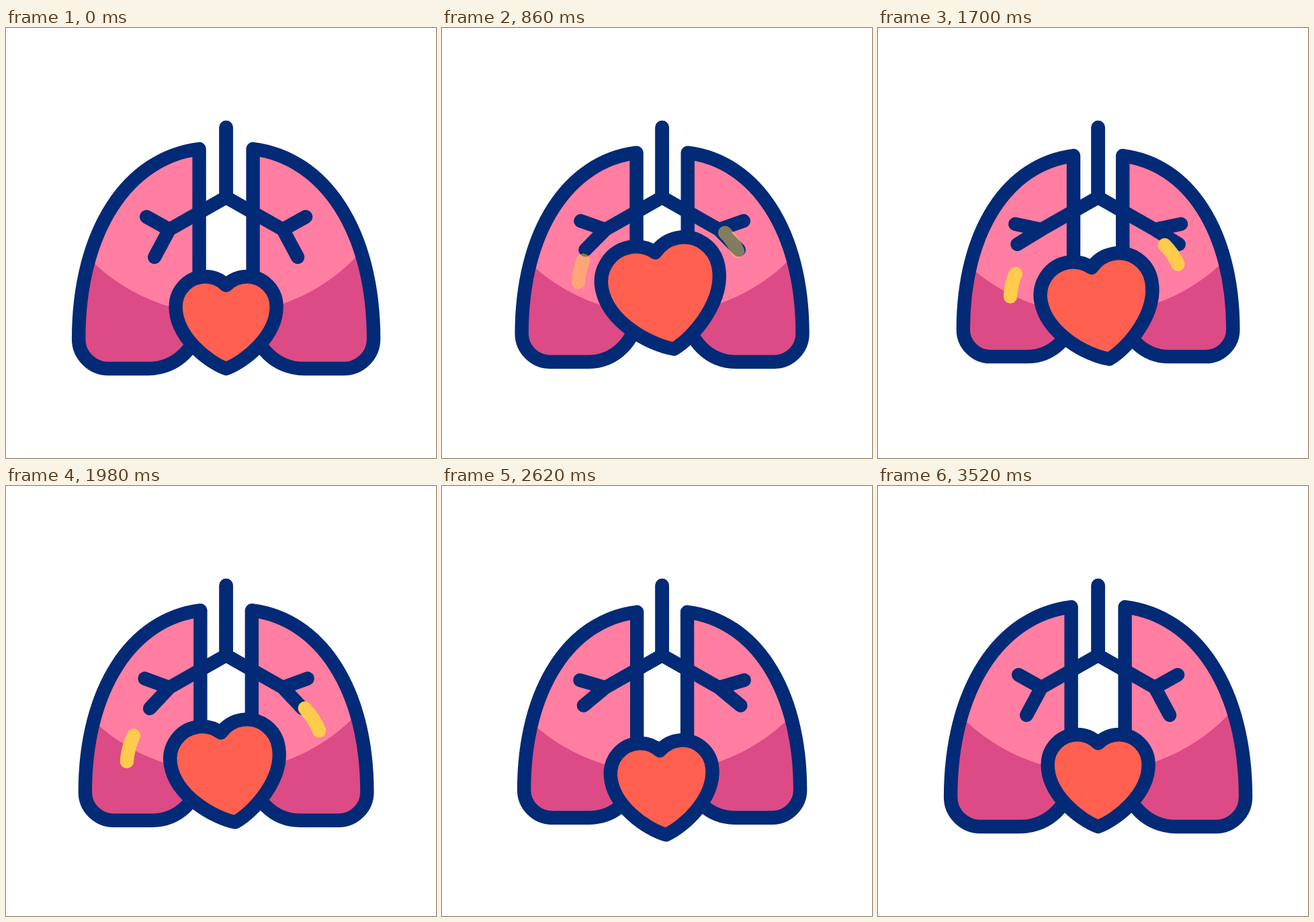
Write an HTML page with a canvas that moves like this. It is 640 by 640 pixels and loops after 3.6 s.

```html
<!DOCTYPE html>
<html lang="en">
<head>
<meta charset="utf-8">
<title>Heart and lungs</title>
<style>
  html, body { margin: 0; width: 100%; height: 100%; overflow: hidden; background: #fff; }
  canvas { display: block; }
</style>
</head>
<body>
<canvas id="stage" width="640" height="640"></canvas>
<script>
const ctx = document.getElementById('stage').getContext('2d');
const LOOP = 3600, END = 3520, MID = 327.6;
const NAVY = '#032a76', PINK = '#ff7ea1', ROSE = '#dc4b85', RED = '#ff6050', YELLOW = '#ffcb4c';

// Paths are relative to their own pivot: lungs (MID, 298), heart (MID, 428).
const lung = new Path2D(`M-40-118V134C-40 176-74.5 209-115.5 209H-175.5
  C-199.5 209-219.5 189-219.5 165C-219.5 4-146.5-105-40-118Z`);
const heart = new Path2D(`M0-45C-8.5-53.5-19.5-58-31-58C-55.5-58-75-38-75-13
  C-75 31-27.5 69 0 79C27.5 69 75 31 75-13C75-38 55.5-58 31-58C19.5-58 8.5-53.5 0-45Z`);
const beat = new Path2D('M113-63Q123-48 127-31M-113-63Q-123-48-127-31');

const span = (t, from, to) => Math.min(1, Math.max(0, (t - from) / (to - from)));
const ease = p => (1 - Math.cos(Math.PI * p)) / 2;

// Lungs alternate between full (0) and contracted (1) at these times.
const turns = [0, 600, 1160, 1640, 2330, 2775, END];

function breath(t) {
  const i = Math.max(1, turns.findIndex(turn => turn >= t));
  const p = ease(span(t, turns[i - 1], turns[i]));
  if (t >= END) return 0;
  return i % 2 ? p : 1 - p;
}

// The heart rocks from side to side, then slowly straightens.
function tilt(t) {
  const first = 245, half = 425, last = first + 3.5 * half;
  if (t < first) return 0;
  if (t < last) return 11.2 * Math.sin(Math.PI * (t - first) / half);
  return -11.2 * (1 - span(t, last, END)) ** 1.4;
}

// Transforms geometry only, so line weight stays constant.
function place(path, x, y, degrees, sx, sy) {
  const out = new Path2D();
  out.addPath(path, new DOMMatrix().translate(x, y).rotate(degrees).scale(sx, sy));
  return out;
}

function stroke(path, color = NAVY) {
  ctx.strokeStyle = color;
  ctx.stroke(path);
}

function drawLung(side, scale) {
  const shape = place(lung, MID, 298, 0, side * scale, scale);
  ctx.save();
  ctx.clip(shape);
  ctx.fillStyle = ROSE;
  ctx.fillRect(0, 0, 640, 640);
  ctx.fillStyle = PINK;
  ctx.beginPath();
  ctx.arc(321.4, 149.4, 276.5, 0, 2 * Math.PI);
  ctx.fill();
  ctx.restore();
  stroke(shape);
}

function drawBronchi(side, b) {
  const path = new Path2D(`M0 148V252L-84.5 300L${-118.5 - 5 * b} ${281 + 11 * b}
    M-84.5 300L${-106.5 - 14 * b} ${341 - 19.5 * b}`);
  stroke(place(path, MID, 0, 0, side, 1));
}

function drawHeart(t) {
  const rise = ease(span(t, 0, 920));
  const fall = span(t, 920, 2800) ** 1.25;
  const settle = ease(span(t, 2800, END));
  const y = 428 - 42 * rise + 60.5 * fall - 18.5 * settle;
  const scale = 1 + .18 * rise - .19 * fall + .01 * settle;
  const angle = tilt(t);

  const appear = span(t, 780, 940);
  const reach = .9 + .1 * appear + .45 * span(t, 1760, 2460);
  const marks = place(beat, 0, 47 * (reach - 1), 0, reach, reach);
  ctx.globalAlpha = appear - span(t, 2200, 2500);
  stroke(place(marks, MID, y, angle, 1, 1), YELLOW);
  ctx.globalAlpha = 1;

  const shape = place(heart, MID, y, angle, scale, scale);
  ctx.fillStyle = RED;
  ctx.fill(shape);
  stroke(shape);
}

function draw(t) {
  ctx.fillStyle = '#fff';
  ctx.fillRect(0, 0, 640, 640);
  ctx.lineWidth = 20.4;
  ctx.lineCap = ctx.lineJoin = 'round';

  const b = breath(t);
  for (const side of [1, -1]) drawLung(side, 1 - .087 * b);
  for (const side of [1, -1]) drawBronchi(side, b);
  drawHeart(t);
}

const start = performance.now();
function tick() {
  draw((performance.now() - start) % LOOP);
  requestAnimationFrame(tick);
}
tick();
</script>
</body>
</html>
```
